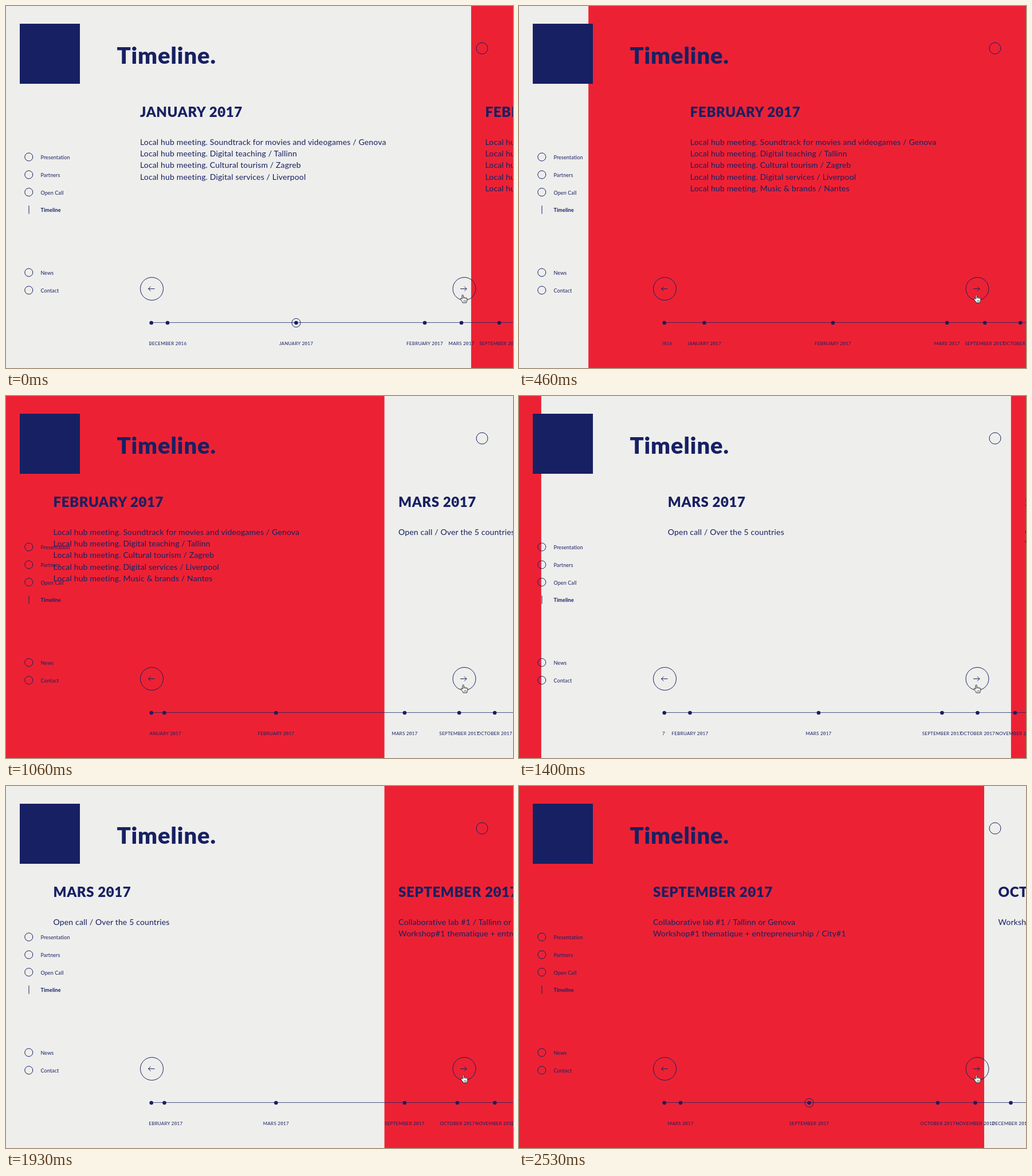
An HTML page for the animation above (2.56 s loop, 885 px wide and 633 px high).

```html
<!DOCTYPE html>
<html lang="en">
<head>
<meta charset="utf-8">
<title>Timeline</title>
<style>
  html, body { margin: 0; width: 100%; height: 100%; overflow: hidden; background: #eeeeec; }
  svg { display: block; width: 885px; height: 633px; font-family: Lato, "Open Sans", sans-serif; fill: #172063; }
  .title { font-size: 40px; font-weight: 900; letter-spacing: .9px; }
  .head { font-size: 24px; font-weight: 900; letter-spacing: .6px; }
  .body { font-size: 14px; font-weight: 400; letter-spacing: .16px; }
  .nav { font-size: 9px; letter-spacing: .1px; }
  .on { font-weight: 700; }
  .label { font-size: 8px; letter-spacing: .25px; text-anchor: middle; }
  .line { fill: none; stroke: #172063; stroke-width: 1; }
</style>
</head>
<body>
<svg id="stage" viewBox="0 0 885 633">
  <defs><clipPath id="track"><rect x="250" y="535" width="635" height="70"/></clipPath></defs>
  <g id="panels"></g>
  <g id="copy"></g>
  <rect x="24" y="31" width="105" height="105"/>
  <text class="title" x="193.5" y="101">Timeline.</text>
  <circle class="line" cx="831" cy="74" r="10"/>
  <g id="nav"></g>
  <path class="line" d="M254 553.5H885" opacity=".75"/>
  <circle cx="253.7" cy="554" r="3.3"/>
  <g id="nodes" clip-path="url(#track)"></g>
  <circle id="ring" class="line" cy="554" r="7.6"/>
  <g class="line">
    <circle cx="254.5" cy="494.5" r="20"/>
    <path d="M259.5 494.5H248.5M252.5 490.5L248.5 494.5L252.5 498.5"/>
    <circle cx="800" cy="494.5" r="20"/>
    <path d="M793 494.5H804M800 490.5L804 494.5L800 498.5"/>
  </g>
  <g id="hand">
    <path d="M-3 -6.2C-3 -7.8 -.8 -7.8 -.8 -6.2V-2.6C-.4 -3.6 1.3 -3.4 1.5 -2.3C2 -3.1 3.5 -2.8 3.7 -1.7C4.4 -2.4 5.8 -1.9 5.8 -.6V2.2C5.8 3.6 4.7 4.4 4.7 6.4H-2C-2 4.6 -4.4 2.8 -5.7 .2C-6.3 -1 -4.8 -1.9 -3.9 -.9L-3 .2Z"
      fill="#fff" stroke="#222" stroke-width="1" stroke-linejoin="round"/>
    <path d="M-.8 -2.6V-.4M1.5 -2.3V-.2M3.7 -1.7V0M-.2 2V4.6M1.6 2V4.6M3.3 2V4.6" fill="none" stroke="#222" stroke-width=".7"/>
  </g>
</svg>
<script>
const LOOP = 2560, STARTS = [-3, 865, 1735];
const PANEL = 820, EDGE = -8, NEAR = 24.5, FAR = 242;
const WIDE = 224.5, LEFT = 282;
const $ = id => document.getElementById(id);

function add(parent, tag, attrs, text) {
  const el = document.createElementNS("http://www.w3.org/2000/svg", tag);
  for (const key in attrs) el.setAttribute(key, attrs[key]);
  if (text) el.textContent = text;
  parent.appendChild(el);
  return el;
}

// Date text whose zero carries a centre dot
function dateText(parent, cls, y, text, size) {
  const el = add(parent, "text", { class: cls, y }, text);
  const box = el.getExtentOfChar(text.indexOf("0"));
  add(parent, "circle", { cx: box.x + size * 0.29, cy: y - size * 0.36, r: size * 0.075 });
}

const hub = "Local hub meeting. ";
const hubs = ["Soundtrack for movies and videogames / Genova", "Digital teaching / Tallinn",
  "Cultural tourism / Zagreb", "Digital services / Liverpool"].map(s => hub + s);
const pages = [
  ["JANUARY 2017", hubs],
  ["FEBRUARY 2017", [...hubs, hub + "Music & brands / Nantes"]],
  ["MARS 2017", ["Open call / Over the 5 countries"]],
  ["SEPTEMBER 2017", ["Collaborative lab #1 / Tallinn or Genova", "Workshop#1 thematique + entrepreneurship / City#1"]],
  ["OCTOBER 2017", ["Workshop#2 thematique / City#2"]]
].map(([head, lines], i) => {
  const rect = add($("panels"), "rect", { width: PANEL + 1, height: 633, fill: i % 2 ? "#ec2234" : "#eeeeec" });
  const copy = add($("copy"), "g");
  dateText(copy, "head", 194, head, 24);
  lines.forEach((s, n) => add(copy, "text", { class: "body", y: 243 + n * 20.2 }, s));
  return { rect, copy };
});

[["Presentation", 264], ["Partners", 295], ["Open Call", 325.5], ["Timeline", 356], ["News", 466], ["Contact", 497]]
  .forEach(([name, y]) => {
    const on = name === "Timeline";
    if (on) add($("nav"), "path", { class: "line", d: `M40 ${y - 7}V${y + 7.5}` });
    else add($("nav"), "circle", { class: "line", cx: 39.8, cy: y, r: 7 });
    add($("nav"), "text", { class: on ? "nav on" : "nav", x: 60.5, y: y + 4.2 }, name);
  });

const names = ["NOVEMBER 2016", "DECEMBER 2016", "JANUARY 2017", "FEBRUARY 2017", "MARS 2017",
  "SEPTEMBER 2017", "OCTOBER 2017", "NOVEMBER 2017", "DECEMBER 2017"];
const gaps = [63.5, 64, 64, 64, 66, 62, 65.5, 62];
const nodes = names.map(name => {
  const g = add($("nodes"), "g");
  add(g, "circle", { cy: 554, r: 3.3 });
  dateText(g, "label", 592.5, name, 8);
  return g;
});

const clamp = v => Math.max(0, Math.min(1, v));
const mix = (a, b, k) => a + (b - a) * k;
function ease(time, start, length) {
  const k = clamp((time - start) / length);
  return k < 0.5 ? 2 * k * k : 1 - 2 * (1 - k) ** 2;
}
const move = (el, x, y = 0) => el.setAttribute("transform", `translate(${x.toFixed(2)} ${y})`);

function nodePlaces(active, slide, shift) {
  const x = [];
  x[active - 1] = LEFT - gaps[active - 1] * shift;
  for (let i = active - 2; i >= 0; i--) x[i] = x[i + 1] - gaps[i];
  for (let i = active; i < nodes.length; i++) {
    const g = gaps[i - 1];
    const gap = i === active ? mix(WIDE, g, slide)
      : i === active + 1 ? WIDE
      : i === active + 2 ? mix(g, WIDE, slide) : g;
    x[i] = x[i - 1] + gap;
  }
  return x;
}

function draw(t) {
  const step = t < STARTS[1] ? 0 : t < STARTS[2] ? 1 : 2;
  const phase = t - STARTS[step];
  const slide = ease(phase, 0, 645);
  const shift = ease(phase, 68, 615);
  const inset = ease(phase, 195, 437);

  pages.forEach(({ rect, copy }, i) => {
    const x = EDGE + PANEL * (i - step - slide);
    const pad = i === step ? mix(FAR, NEAR, inset) : i === step + 1 ? mix(NEAR, FAR, inset) : NEAR;
    rect.setAttribute("x", x.toFixed(2));
    move(copy, x + pad);
  });

  const active = step + 2;
  const places = nodePlaces(active, slide, shift);
  nodes.forEach((g, i) => move(g, places[i]));

  const leaving = phase < 400;
  $("ring").setAttribute("cx", places[leaving ? active : active + 1].toFixed(2));
  $("ring").setAttribute("opacity", leaving ? clamp(1 - (phase - 10) / 100) : clamp((phase - 715) / 70));
  move($("hand"), 799 + clamp(t / 200), 512.5);
}

function tick() {
  draw(performance.now() % LOOP);
  requestAnimationFrame(tick);
}
tick();
</script>
</body>
</html>
```
